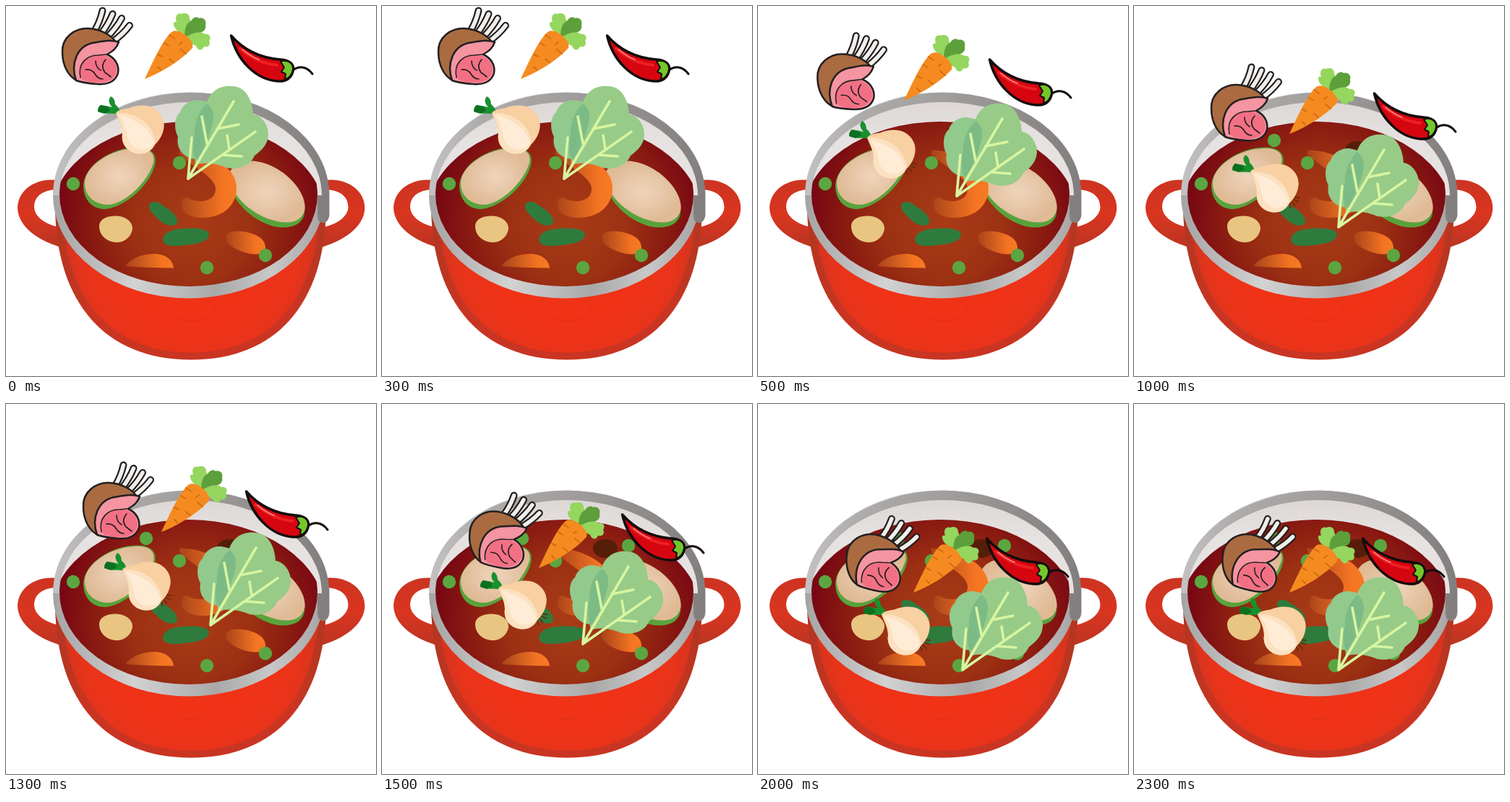
An HTML page for the animation above (2.5 s loop, 512 by 512 pixels).

```html
<!DOCTYPE html>
<html lang="en">
<head>
<meta charset="utf-8">
<title>Stew pot</title>
<style>
html, body { margin: 0; width: 100%; height: 100%; overflow: hidden; background: #fff; }
svg { display: block; width: 100vw; height: 100vh; }
</style>
</head>
<body>
<svg viewBox="0 0 512 512">
  <defs>
    <linearGradient id="side">
      <stop stop-color="#b23621"/><stop offset=".12" stop-color="#c93522"/>
      <stop offset=".88" stop-color="#c93522"/><stop offset="1" stop-color="#b23621"/>
    </linearGradient>
    <radialGradient id="body" gradientUnits="userSpaceOnUse" cx="256" cy="340" r="185">
      <stop offset=".55" stop-color="#f03217"/><stop offset=".8" stop-color="#e8341a"/>
      <stop offset="1" stop-color="#cd3521"/>
    </radialGradient>
    <linearGradient id="handle" x2="0" y2="1">
      <stop stop-color="#cc3421"/><stop offset=".5" stop-color="#d93520"/><stop offset="1" stop-color="#bb3522"/>
    </linearGradient>
    <linearGradient id="rimTop">
      <stop stop-color="#c3c1c1"/><stop offset=".2" stop-color="#aeabab"/>
      <stop offset=".5" stop-color="#a19e9d"/><stop offset="1" stop-color="#827e7d"/>
    </linearGradient>
    <linearGradient id="rimLow">
      <stop stop-color="#a5a4a4"/><stop offset=".3" stop-color="#d3d2d2"/>
      <stop offset=".6" stop-color="#a9a8a8"/><stop offset=".8" stop-color="#c9c8c8"/><stop offset="1" stop-color="#a5a3a3"/>
    </linearGradient>
    <linearGradient id="wall" x2="0" y2="1">
      <stop stop-color="#ddd8d6"/><stop offset=".4" stop-color="#e6e2e1"/>
    </linearGradient>
    <radialGradient id="soup" gradientUnits="userSpaceOnUse" cx="258" cy="300" r="185">
      <stop stop-color="#a93c16"/><stop offset=".45" stop-color="#9c3013"/>
      <stop offset=".8" stop-color="#861611"/><stop offset="1" stop-color="#770813"/>
    </radialGradient>
    <radialGradient id="flesh">
      <stop stop-color="#efd5bd"/><stop offset="1" stop-color="#dfba95"/>
    </radialGradient>
    <linearGradient id="orange">
      <stop stop-color="#a9431a"/><stop offset=".75" stop-color="#f47422"/><stop offset="1" stop-color="#f67a24"/>
    </linearGradient>
    <clipPath id="mouth"><ellipse cx="252.5" cy="260.5" rx="178.5" ry="127.5"/></clipPath>
    <path id="grip" fill="url(#handle)" d="M72 241C42 237 16 254 16 280C17 306 46 326 80 335V307C56 304 39 292 39 278C39 262 53 254 72 254Z"/>
    <path id="bones" d="M122 35Q130 22 133.500 6.500M131 39Q142 25 147.500 11M140 43Q153 30 160 17M148 49Q162 39 171 27"/>
  </defs>

  <!-- pot -->
  <use href="#grip"/>
  <use href="#grip" transform="matrix(-1 0 0 1 512.500 0)"/>
  <path fill="url(#side)" d="M68 280C70 412 138 489.500 256 489.500S441 412 443 280Z"/>
  <path fill="url(#body)" d="M78 280C80 405 146 479.500 256 479.500S431 405 433 280Z"/>
  <path fill="none" stroke="#d8301a" stroke-width="1" stroke-opacity=".5" d="M222 412C228 444 284 444 290 412M236 433Q256 440 272 433"/>
  <ellipse cx="253" cy="262" rx="188" ry="142.500" fill="url(#rimLow)"/>
  <path fill="url(#rimTop)" d="M65 262A191 142 0 0 1 447.500 262V288C447 304 431 304 431 290V262Z"/>
  <path fill="url(#wall)" d="M74 262A181.500 129 0 0 1 437 262Z"/>
  <g clip-path="url(#mouth)">
    <path fill="url(#soup)" d="M62 292A190 132 0 0 1 442 292V400H62Z"/>
  </g>

  <!-- things already in the soup -->
  <ellipse cx="309" cy="200" rx="17" ry="13" fill="#561e09"/>
  <path fill="#58a33c" d="M107 248C108 222 143 196 182 195.500C204 196 209 208 206 220C198 252 158 282 134 281C115 279 107 264 107 248Z"/>
  <path fill="url(#flesh)" d="M109 243C111 221 145 197 182 197C202 197 206 207 204 217C195 247 160 277 138 275C118 273 108 259 109 243Z"/>
  <path fill="#58a33c" d="M308 238C311 224 325 215 342 215C380 219 417 256 413 287C410 303 394 308 376 306C345 301 309 270 308 238Z"/>
  <path fill="url(#flesh)" d="M308 235C311 221 325 214 343 214.500C381 218 416 255 413.500 281C410 297 397 301 380 299C347 294 311 266 308 235Z"/>
  <path fill="#e8c580" d="M129 305C129 294 142 290 153 290.500C166 291 176 299 175 309C173 320 163 328 152 327C138 326 129 316 129 305Z"/>
  <path fill="url(#orange)" d="M240 200C268 198 320 218 319 253C318 281 294 294 269 293C255 292 243 286 243 277C243 269 245 263 252 266C270 275 291 269 290 252C288 236 262 226 240 205Z"/>
  <path fill="#2f7b3e" d="M198 276C199 269 209 270 216 275C225 281 239 290 237 299C234 307 222 304 214 298C207 291 197 284 198 276Z"/>
  <path fill="#2f7b3e" d="M217 323C219 311 234 308 252 307.500C267 307 280 309 281 316C280 326 266 329 248 331C232 333 217 333 217 323Z"/>
  <path fill="url(#orange)" d="M304 321C303 313 314 310 328 312C346 315 359 322 359 334C358 345 344 345 330 341C317 337 305 330 304 321Z"/>
  <path fill="url(#orange)" d="M165 360C174 347 194 342 208 343C222 344 231 352 232 362.500Q195 362 165 360Z"/>
  <g id="peas" fill="#5ba640"></g>

  <!-- falling ingredients -->
  <g id="meat" stroke="#231f20" stroke-width="2.500" stroke-linejoin="round" stroke-linecap="round">
    <use href="#bones" fill="none" stroke-width="10"/>
    <use href="#bones" fill="none" stroke="#f1efeb" stroke-width="5.500"/>
    <path fill="#aa6b40" d="M78 64C77 43 96 30 114 31C131 32 148 41 153 52L126 62L98 103C87 98 78 83 78 64Z"/>
    <path fill="#f495a1" d="M97 103C89 80 98 56 120 51C133 49 146 46 156 50C153 59 147 63 140 67C151 72 157 82 155 93C151 106 139 109 126 108C113 107 104 106 97 103Z"/>
    <path fill="#f27084" stroke="none" d="M105 101C99 83 108 71 124 69C139 66 149 73 152 83C156 96 146 105 132 106C120 107 111 105 105 101Z"/>
    <path fill="none" stroke-width="1.600" d="M103 99C99 80 111 68 128 68L140 67M124 76Q124 85 131 89M138 74Q130 83 137 92L145 98M110 88Q119 87 123 94T134 101"/>
  </g>

  <g id="carrot">
    <path fill="#95d65e" d="M248 39C239 38 231 30 232 23C234 21 236 22 236 22C233 13 238 9 243 11C249 8 255 12 254 18C260 25 256 33 248 39Z"/>
    <path fill="#5d9f3a" d="M247 42C247 31 250 23 256 21C258 16 264 14 267 17C273 15 278 20 276 26C278 34 270 38 263 37C258 42 252 43 247 42Z"/>
    <path fill="#95d65e" d="M250 42C261 36 270 35 275 39C281 38 285 43 281 48C284 54 279 58 274 56C271 64 264 60 263 55C257 53 253 48 250 42Z"/>
    <path fill="#f58b20" d="M192 101C202 80 215 50 228 37C234 31 244 36 251 42.500C258 49 261 56 256 60C241 76 215 92 192 101Z"/>
    <path fill="none" stroke="#d36d12" stroke-width="2" stroke-linecap="round" d="M226 40L233 45M249 66L242 60M219 51L225 55M232 78L226 73M210 67L216 70M214 88L210 84M240 53L244 50"/>
  </g>

  <g id="pepper" stroke-linecap="round" stroke-linejoin="round">
    <path fill="none" stroke="#160d0d" stroke-width="3" d="M398 88C405 83 416 83 424 94"/>
    <path fill="#d60510" stroke="#160d0d" stroke-width="3.500" d="M311.500 41C329 61 353 72 379 74C392 75 398 80 397.500 88C396 99 388 105 376 104C345 102 319 74 311.500 41Z"/>
    <path fill="none" stroke="#ee2024" stroke-width="4" d="M324 59C340 73 358 80 375 82"/>
    <path fill="none" stroke="#ff9890" stroke-width="1.500" d="M327 60Q339 70 350 74"/>
    <path fill="#72c72a" stroke="#160d0d" stroke-width="2" d="M380 77C389 73 398 79 397 88C396 95 391 101 386 101L387 94L381 91L385 85Z"/>
  </g>

  <g id="onion">
    <path id="roots" fill="none" stroke="#63300f" stroke-width="1.800" d="M206 183L220 184M206 184L219 190M205 185L214 196M203 185L208 199"/>
    <path fill="#17902d" d="M154 150C147 147 139 151 127 146Q127 140 131 137Q139 138 147 140Q139 132 145 125Q151 128 151 136Q157 141 158 148Z"/>
    <path fill="#0b7020" d="M127 146Q127 140 131 137L141 140L144 145L136 149Z"/>
    <path fill="#f8d0a2" d="M152 148C157 142 165 143 171 141C181 137 194 136 204 141C215 147 221 159 218 171C216 181 210 188 206 192C201 202 191 206 180 204C167 201 159 190 161 177C161 165 155 158 152 148Z"/>
    <path fill="#fce1c1" d="M154 148C177 147 203 160 207 189C201 203 191 206 180 204C167 201 159 190 161 177C161 165 156 158 154 148Z"/>
    <path fill="#feecd6" d="M156 151C180 156 201 171 205 190C196 203 178 200 171 188C165 176 167 162 156 151Z"/>
  </g>

  <g id="greens" stroke-linecap="round">
    <path fill="#92c98c" d="M256 211C239 205 236 191 238 181C231 168 234 152 241 147C244 135 260 127 271 131C283 132 289 143 286 160L266 212Z"/>
    <path fill="#97cb87" d="M262 215C260 205 258 192 261 178C260 160 267 145 277 137C281 118 297 109 313 111C330 111 341 128 342 150C354 151 364 166 363 179C362 193 352 201 344 207C338 221 323 227 306 224C291 218 276 215 262 220Z"/>
    <path fill="#7dbb86" d="M261 210C258 197 258 188 261 178C260 160 268 144 278 135C286 140 289 150 286 162C282 180 274 199 264 213Z"/>
    <path fill="none" stroke="#d7f5a1" stroke-width="3.600" d="M252 239L315 132M252 239L345 174M252 238L257 182M271 153L278 190M292 170L322 164M309 198L306 179M299 206L326 208"/>
  </g>
</svg>
<script>
const STEP = 500;
const CENTRE = [125.5, 55.5];
// offsets x, y and optional turn for each beat
const moves = {
  meat: [[0, 0, 0], [4, 35, -2], [29, 78, 0], [44, 119, 6], [45.5, 151, 7]],
  carrot: [[0, 0], [10, 30], [23, 76], [25, 126], [23, 160]],
  pepper: [[0, 0], [9, 33], [21, 80], [21, 112], [5, 145]],
  onion: [[0, 0], [-1, 34], [9, 81], [9, 107], [19, 143]],
  greens: [[0, 0], [23, 24], [31, 67], [26, 93], [31, 129]]
};
const peas = [[240, 217], [93, 246], [278, 362], [359, 345], [194, 186], [341, 196]];
const el = id => document.getElementById(id);

el('peas').innerHTML = peas.map(([x, y]) => `<circle cx="${x}" cy="${y}" r="9.2"/>`).join('');

function draw(time) {
  const beat = Math.floor(time / STEP) % 5;
  for (const id in moves) {
    const [x, y, turn = 0] = moves[id][beat];
    el(id).setAttribute('transform', `translate(${x} ${y}) rotate(${turn} ${CENTRE})`);
  }
  el('roots').setAttribute('opacity', beat ? 1 : 0);
}

const start = performance.now();
function tick() {
  draw(performance.now() - start);
  requestAnimationFrame(tick);
}
tick();
</script>
</body>
</html>
```
